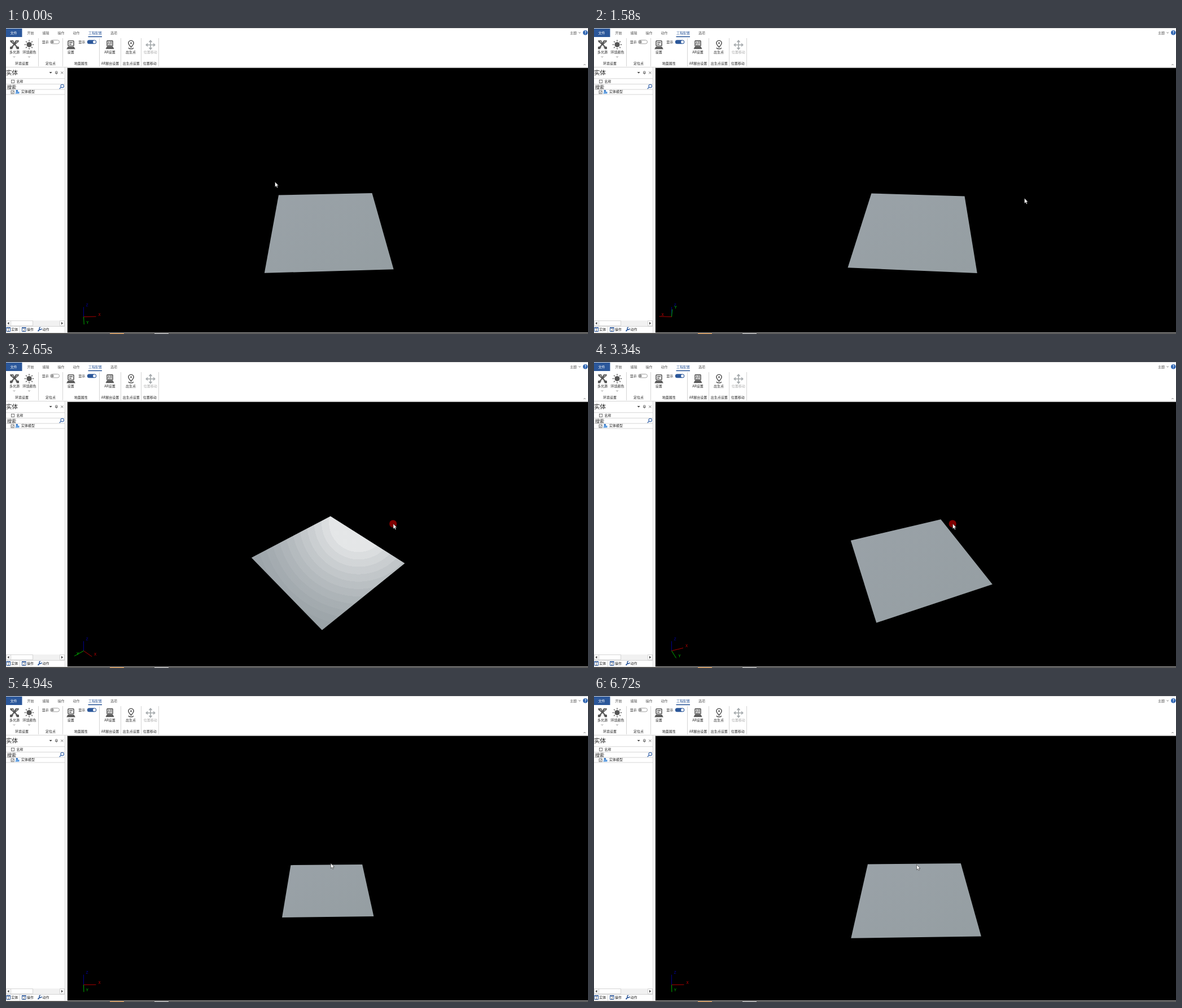
Recreate the animation shown at these times as an HTML page. Size 1031 px wide and 543 px high, loop 6.79 s.

```html
<!DOCTYPE html>
<html lang="zh">
<head>
<meta charset="utf-8">
<title>地面旋转</title>
<style>
html, body { margin: 0; width: 100%; height: 100%; overflow: hidden; background: #fff; }
svg { display: block; width: 100%; height: 100%; }
text { font: 6px "Noto Sans CJK SC", "Noto Sans CJK JP", "Noto Sans CJK", sans-serif; fill: #222; }
.mid text { text-anchor: middle; }
.tabs text { fill: #555; }
.axis { fill: none; stroke-width: 1; }
.lab { font: 7px "Liberation Mono", monospace; text-anchor: middle; }
.ico { fill: none; stroke: #555; stroke-width: 1.6; }
.thin { fill: none; stroke: #555; stroke-width: .8; }
.rule { fill: none; stroke: #d5d5d5; stroke-width: 1; }
.box { fill: #fff; stroke: #ccc; stroke-width: .8; }
</style>
</head>
<body>
<svg viewBox="0 0 1031 543" preserveAspectRatio="none">
  <defs>
    <linearGradient id="base" x1="0" y1="0" x2="1" y2="1">
      <stop offset="0" stop-color="#9aa2a8"/><stop offset="1" stop-color="#959ea2"/>
    </linearGradient>
    <radialGradient id="shine" gradientUnits="userSpaceOnUse" r="210"></radialGradient>
  </defs>
  <rect width="1031" height="543" fill="#fff"/>
  <path class="rule" d="M0 .5H1031"/>

  <!-- ribbon tabs -->
  <rect y="1" width="28.5" height="15" fill="#2b579a"/>
  <g class="mid tabs">
    <text x="13.5" y="11" style="fill:#fff">文件</text>
    <text x="43.5" y="11">开始</text><text x="70.5" y="11">编辑</text>
    <text x="97.5" y="11">操作</text><text x="124.5" y="11">动作</text>
    <text x="158" y="11" style="fill:#2b579a">工程配置</text><text x="191" y="11">选项</text>
    <text x="1005" y="11">主题</text>
  </g>
  <rect x="145.5" y="14.6" width="24.5" height="1.6" fill="#2b579a"/>
  <path class="thin" d="M1014.5 7.5l1.7 1.7 1.7-1.7"/>
  <circle cx="1026.3" cy="8.2" r="4.3" fill="#2b62b0"/>
  <g class="mid"><text x="1026.3" y="10.8" style="fill:#fff;font-size:7px;font-weight:700">?</text></g>

  <!-- ribbon groups -->
  <path class="rule" d="M57.5 18V68M100.5 18V68M165.5 18V68M203.5 18V68M239.5 18V68M270.5 18V68"/>
  <g class="mid">
    <text x="15" y="45">多光源</text><text x="41.5" y="45">环境颜色</text><text x="114.8" y="45">设置</text>
    <text x="184" y="45">AR设置</text><text x="221" y="45">出生点</text>
    <text x="255.8" y="45" style="fill:#aaa">位置移动</text>
    <text x="69.8" y="27">显示</text><text x="134.3" y="27">显示</text>
    <text x="28" y="64.5">环境设置</text><text x="79" y="64.5">定位点</text><text x="132.7" y="64.5">地面属性</text>
    <text x="184.5" y="64.5">AR展台设置</text><text x="221.7" y="64.5">出生点设置</text><text x="254.8" y="64.5">位置移动</text>
  </g>
  <path class="thin" d="M13 50.5l1.5 1.5 1.5-1.5M39.5 50.5l1.5 1.5 1.5-1.5M1023.3 66l1.7-1.7 1.7 1.7"/>
  <path fill="#555" d="M7 22h6l2 4 2-4h6l-1 3-5 3.8 2.5 3.7 3.5 1v4h-4l-1.2-3-2.8-3-2.8 3-1.2 3H7v-4l3.5-1 2.5-3.7L8 25z"/>
  <path fill="#fff" d="M9.5 24h3l1 2zM17.5 26l1-2h3zM12 33l3-2.5 3 2.5z"/>
  <circle cx="41" cy="29.5" r="4.6" fill="#555"/>
  <circle cx="41" cy="29.5" r="7" fill="none" stroke="#555" stroke-width="2.4" pathLength="8" stroke-dasharray=".26 .74" stroke-dashoffset=".13"/>
  <rect class="ico" x="110" y="22.8" width="10" height="9" rx="1"/>
  <path class="ico" d="M112 25.8h6M112 28.8h4"/>
  <path fill="#555" d="M109.5 33.3h11l2.3 4.2h-15.6z"/>
  <rect class="ico" x="179" y="22.6" width="10" height="9.5" rx="1"/>
  <g class="mid"><text x="184" y="28.5" style="font-weight:700;font-size:5.5px;fill:#555">AR</text></g>
  <path class="ico" d="M181 30.2h6" stroke-dasharray="1.5 1"/>
  <path fill="#555" d="M178.5 33.3h11l2 4h-15z"/>
  <path class="ico" d="M221.5 34.2c-1.5-2.4-4.6-4.2-4.6-7.4a4.6 4.6 0 0 1 9.2 0c0 3.2-3.1 5-4.6 7.4zM218 35.2c-3 1.6 8 3 7.4 0"/>
  <circle cx="221.5" cy="26.8" r="1.5" fill="#555"/>
  <path fill="none" stroke="#a3a8ab" stroke-width="1.6" d="M256 23v14M249 30h14M253.5 25l2.5-2.7 2.5 2.7M253.5 35l2.5 2.7 2.5-2.7M251 27.5l-2.7 2.5 2.7 2.5M261 27.5l2.7 2.5-2.7 2.5"/>
  <rect x="78.5" y="21.5" width="16" height="6.4" rx="3.2" fill="#fff" stroke="#8a8a8a" stroke-width=".8"/>
  <circle cx="82" cy="24.7" r="2.6" fill="#999"/>
  <rect x="143.8" y="21.2" width="16.4" height="7" rx="3.5" fill="#2b579a"/>
  <circle cx="156.6" cy="24.7" r="2.5" fill="#fff"/>

  <!-- entity panel -->
  <path class="rule" d="M0 69.5H1031M0 89.8H105M0 99.6H105M0 109H105M0 118H105M104.5 70V541"/>
  <text x="0" y="83" style="font-size:10.5px">实体</text>
  <path fill="#444" d="M76.6 78h5l-2.5 2.8z"/>
  <path class="thin" d="M87.8 77h3v3.2h-3zM86.8 80.2h5M89.3 80.2v2.4M97.3 77.4l4 4M101.3 77.4l-4 4"/>
  <rect class="thin" x="9.5" y="92.3" width="5.2" height="5.2"/>
  <text x="18.5" y="97">名称</text>
  <text x="2" y="107.5" style="font-size:8px">搜索</text>
  <g fill="none" stroke="#2f5fa8" stroke-width="1.1"><circle cx="99.7" cy="103" r="2.8"/><path d="M97.7 105l-3 3"/></g>
  <rect class="thin" x="9" y="111.2" width="5.2" height="5.2"/>
  <path class="thin" d="M10 113.8l1.3 1.4 2-3"/>
  <circle cx="19.3" cy="111.7" r="2" fill="#3f7fca"/>
  <path fill="#5b9be0" d="M16.4 116.5c0-4 5.8-4 5.8 0zM20.5 113h3v3.5h-3z"/>
  <text x="27" y="115.3">实体模型</text>

  <rect y="519" width="104" height="10" fill="#f1f1f1"/>
  <path class="box" d="M.5 519.5h8v9h-8zM8.5 519.5h39v9h-39zM95.5 519.5h8v9h-8z"/>
  <path fill="#444" d="M5.5 521.5v5l-3-2.5zM98 521.5v5l3-2.5z"/>
  <path class="rule" d="M24.5 530V541M0 529.5H105"/>
  <path fill="#fff" stroke="#2b579a" d="M1 531.5h6.5v7H1zM28.5 531.5H35v7h-6.5z"/>
  <path fill="#2b579a" d="M.5 531H8v1.8H.5zM28 531h7.5v1.8H28z"/>
  <g class="mid"><text x="4.3" y="538" style="font-size:5.5px">1</text><text x="31.8" y="538" style="font-size:5.5px">2</text></g>
  <path d="M56.5 538l3.6-3.6" stroke="#2b579a" stroke-width="1.8"/>
  <path d="M63 533.2a2 2 0 1 1-2-2" fill="none" stroke="#2b579a" stroke-width="1.4"/>
  <text x="9.3" y="537">实体</text><text x="37" y="537">操作</text><text x="64.5" y="537">动作</text>

  <!-- viewport -->
  <rect x="108" y="70" width="923" height="471" fill="#d0d0d0"/>
  <rect x="109" y="71" width="922" height="470" fill="#000"/>
  <path fill="#d0d0d0" d="M0 540.6h1031v1.2H0z"/>
  <path fill="#111" d="M0 541.8h1031V543H0z"/>
  <path fill="#d98b3a" d="M184 541.8h25V543h-25z"/>
  <path fill="#aaa" d="M263 541.8h25V543h-25z"/>

  <polygon id="ground" fill="url(#base)"/>
  <polygon id="gloss" fill="url(#shine)"/>
  <path class="axis" id="az" stroke="#00008c"/><text class="lab" id="lz" style="fill:#0000a0">Z</text>
  <path class="axis" id="ax" stroke="#aa0000"/><text class="lab" id="lx" style="fill:#c00000">X</text>
  <path class="axis" id="ay" stroke="#00aa00"/><text class="lab" id="ly" style="fill:#00c000">Y</text>
  <g id="pointer">
    <circle id="dot" cx="-.3" r="6.6" fill="#800000"/>
    <path d="M0 0V9.2L2.1 7.3 3.5 10.4 5 9.7 3.6 6.7H6.3Z" fill="#fff" stroke="#222" stroke-width=".6"/>
  </g>
</svg>
<script>
const $ = id => document.getElementById(id);
const set = (id, attrs) => { for (const k in attrs) $(id).setAttribute(k, attrs[k]); };

// highlight fades outwards in flat rings
const RINGS = 16, CORE = 3;
for (let i = 0; i < RINGS; i++) {
  const fade = Math.max(0, (i - CORE) / (RINGS - CORE));
  for (const edge of [i, i + 1]) {
    const stop = document.createElementNS('http://www.w3.org/2000/svg', 'stop');
    stop.setAttribute('offset', edge / RINGS);
    stop.setAttribute('stop-color', '#fafafa');
    stop.setAttribute('stop-opacity', .78 * (1 - fade) ** 1.6);
    $('shine').append(stop);
  }
}

const LOOP = 6790, STEP = 133.2, LEAD = 25;   // the screen refreshes once per STEP
const DRAG_Y = 287;                           // height at which the mouse drags

// [step, mouse x, mouse y, yaw]
const MOVES = [
  [0, 476.5, 273, 2], [1, 468, DRAG_Y, 2], [7, 806, DRAG_Y, 92],
  [10, 455, DRAG_Y, 92], [11, 740, DRAG_Y, 170], [12, 762.5, 302, 177],
  [13, 690, DRAG_Y, 158], [17, 130, DRAG_Y, -20],
  [19, 755, DRAG_Y, -20], [20, 686, DRAG_Y, -48], [21, 604, 285, -50], [22, 386, 285, -50],
  [23, 470, DRAG_Y, -28], [25, 635.5, DRAG_Y, 21.3], [30, 577, DRAG_Y, 1],
  [32, 575.3, 296.7, 1], [40, 575.3, 296.7, 1], [41, 573.6, 292.5, 1], [43, 573.6, 292.5, 1], [44, 571.6, 299.3, 1]
];
const PITCH = [[0, 38], [12, 36.9], [20, 39], [25, 39], [30, 35.4]];

function at(track, k) {
  const i = track.findIndex(row => row[0] > k);
  if (i < 0) return track[track.length - 1].slice(1);
  const a = track[i - 1], b = track[i], f = (k - a[0]) / (b[0] - a[0]);
  return a.slice(1).map((v, j) => v + (b[j + 1] - v) * f);
}

function ease(k, from, to) {
  const f = Math.min(1, Math.max(0, (k - from) / (to - from)));
  return f * f * (3 - 2 * f);
}

const FOCAL = 471, CX = 569, CY = 305.5, DROP = .485, RAD = Math.PI / 180;

function draw(k) {
  const [mx, my, yaw] = at(MOVES, k), [pitch] = at(PITCH, k);
  const dist = 4.9 + .1 * ease(k, 25, 31) + 2.77 * ease(k, 32, 41) - 2.87 * ease(k, 43, 50);
  const ca = Math.cos(yaw * RAD), sa = Math.sin(yaw * RAD);
  const cp = Math.cos(pitch * RAD), sp = Math.sin(pitch * RAD);
  const project = (x, y) => {
    const u = x * ca - y * sa, v = x * sa + y * ca, z = dist + v * cp;
    return [CX + FOCAL * u / z, CY + FOCAL * (DROP - v * sp) / z];
  };

  const points = [[-1, -1], [1, -1], [1, 1], [-1, 1]].map(p => project(...p)).join(' ');
  const [cx, cy] = project(-.416, 1.3);
  set('ground', { points });
  set('gloss', { points, opacity: Math.exp(-(((yaw + 49) / 20) ** 2)) });
  set('shine', { cx, cy });

  const axis = (name, x, y) => {
    const ex = 137.5 + 22 * x, ey = 512.5 - 22 * y;
    set('a' + name, { d: `M137.5 512.5L${ex} ${ey}` });
    set('l' + name, { x: ex + 6, y: ey - 1.3 });
  };
  axis('x', ca, sa * sp);
  axis('y', sa, -ca * sp);
  axis('z', 0, cp);

  const turning = k > 0 && at(MOVES, k - 1)[2] !== yaw;
  set('pointer', { transform: `translate(${mx} ${my})` });
  set('dot', { visibility: turning && my === DRAG_Y ? 'visible' : 'hidden' });
}

const start = performance.now();
function frame() {
  const t = (performance.now() - start) % LOOP;
  draw(Math.floor((t + LEAD) / STEP));
  requestAnimationFrame(frame);
}
frame();
</script>
</body>
</html>
```
